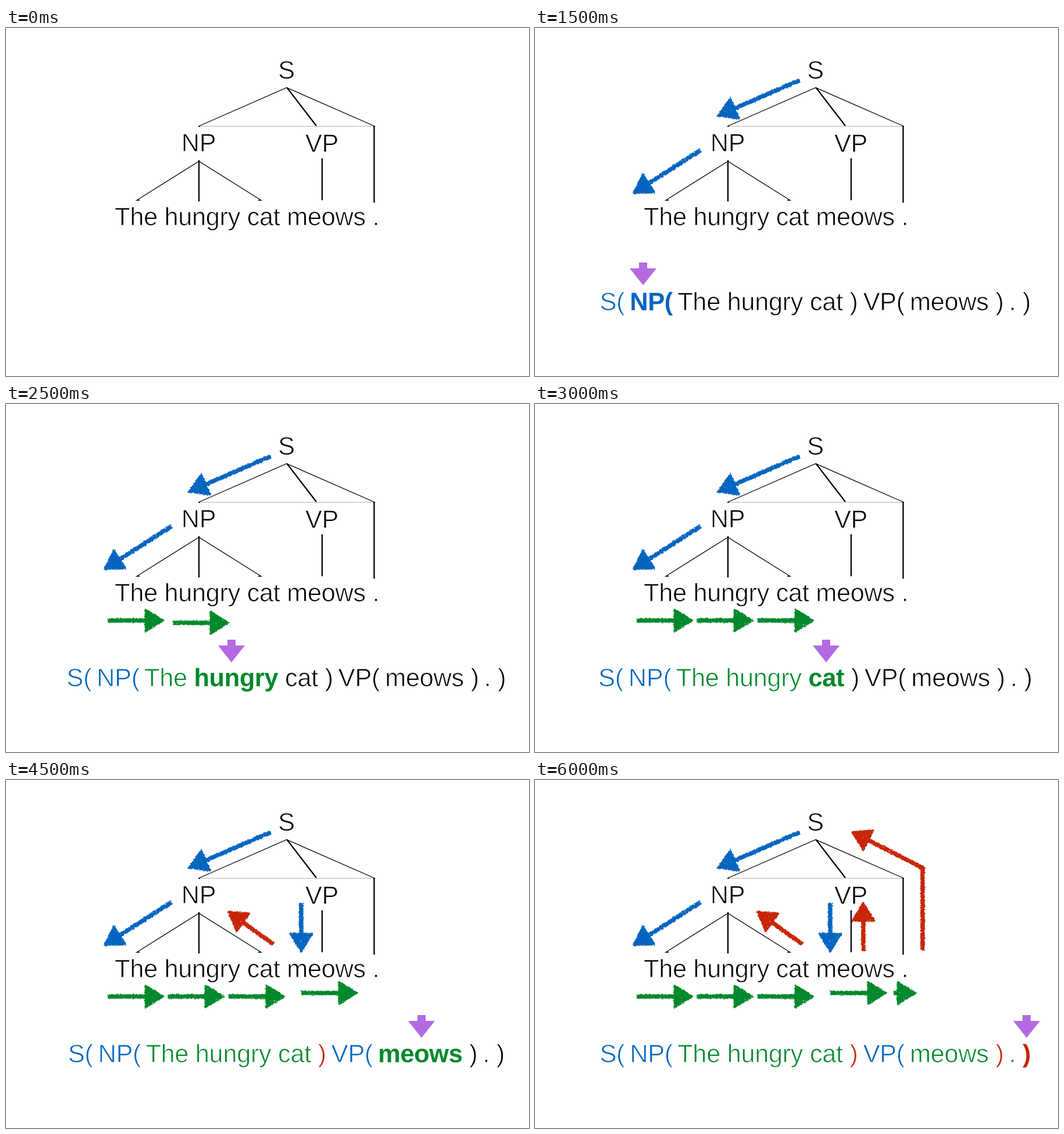
These frames come from a looping animation (900x598 px, 6.5 s). An HTML page:

```html
<!DOCTYPE html>
<html lang="en">
<head>
<meta charset="utf-8">
<title>Parse tree traversal</title>
<style>
  html, body { margin: 0; width: 100%; height: 100%; overflow: hidden; background: #fff; }
  svg { display: block; }
  /* The white outline thins the regular weight to a light one. */
  text {
    font: 43.4px "Liberation Sans", Arial, sans-serif; letter-spacing: -.35px;
    stroke: #fff; stroke-width: .9; white-space: pre; text-rendering: geometricPrecision;
  }
  .mid { text-anchor: middle; }
  .bold { font-weight: 700; stroke: none; }
  .paren { letter-spacing: -3px; }
  .tree { fill: none; stroke: #000; stroke-width: 1.3; }
  .thick { stroke-width: 2.3; }
</style>
</head>
<body>
<svg width="900" height="598" viewBox="0 0 900 598">
  <filter id="crayon" filterUnits="userSpaceOnUse" x="0" y="0" width="900" height="598" color-interpolation-filters="sRGB">
    <feTurbulence type="fractalNoise" baseFrequency=".33" numOctaves="2" seed="4" result="noise"/>
    <feDisplacementMap in="SourceGraphic" in2="noise" scale="4" xChannelSelector="R" yChannelSelector="G" result="rough"/>
    <feColorMatrix in="noise" values="0 0 0 0 0  0 0 0 0 0  0 0 0 0 0  0 0 0 8 -5.8" result="flecks"/>
    <feComposite in="rough" in2="flecks" operator="out"/>
  </filter>

  <g class="tree">
    <path d="M331 169H635" stroke="#aaa" stroke-width="1"/>
    <path d="M334 169H331L483 102.500 635 169H632M230 296H225L332 229 439 296H434"/>
    <path class="thick" d="M483.500 102.500L534 168M633.500 169V300M332 227V298M544 224V296"/>
  </g>
  <text class="mid" x="482.500" y="86.500">S</text>
  <text class="mid" x="331.500" y="211.500">NP</text>
  <text class="mid" x="543.500" y="212.500">VP</text>
  <text x="187" y="338.500">The hungry cat meows .</text>

  <g id="arrows" filter="url(#crayon)"></g>
  <path id="pointer" fill="#b36ae2" d="M-7 0h14v10h16L0 39-23 10h16z"/>
  <text id="sentence" class="mid" x="481" y="484.500"></text>
</svg>
<script>
const STEP = 500, STEPS = 13;
const BLUE = '#0365c0', GREEN = '#00882b', RED = '#c82506';
const TOKENS = 'S( NP( The hungry cat ) VP( meows ) . )'.split(' ');
const $ = id => document.getElementById(id);

// Pointer position for each step after the first
const POINTER = [[94, 403], [127, 403], [186, 403], [279, 405], [388, 405], [501, 405],
  [549, 405], [589, 405], [715, 404], [793, 403], [822, 404], [846, 404]];

// Colour, first step, last step, points from tail to tip
const ARROWS = [
  [BLUE, 2, 12, [455, 90], [314, 151]],
  [BLUE, 3, 12, [285, 210], [169, 284]],
  [GREEN, 4, 12, [175, 372], [272, 372]],
  [GREEN, 5, 5, [287, 376], [384, 376]],
  [GREEN, 6, 12, [278, 372], [375, 372]],
  [GREEN, 6, 12, [383, 372], [480, 372]],
  [RED, 7, 12, [460, 282], [382, 226]],
  [BLUE, 8, 12, [508, 211], [508, 296]],
  [GREEN, 9, 12, [508, 366], [605, 366]],
  [RED, 10, 12, [565, 294], [565, 210]],
  [GREEN, 11, 12, [617, 366], [656, 366]],
  [RED, 12, 12, [667, 293], [667, 151], [545, 89]]
];

function arrow([color, , , ...points]) {
  const [x, y] = points.pop(), [px, py] = points.at(-1);
  const angle = Math.atan2(y - py, x - px), cos = Math.cos(angle), sin = Math.sin(angle);
  const shaft = [...points, [x - 28 * cos, y - 28 * sin]].join(' ');
  return `<g fill="${color}" stroke="${color}" stroke-linejoin="round">
    <polyline points="${shaft}" fill="none" stroke-width="7.500"/>
    <path d="M-1 0L-32-19V19z" stroke-width="3" transform="translate(${x} ${y}) rotate(${angle * 180 / Math.PI})"/></g>`;
}

function token(text, i, step) {
  const current = step - 2;
  const color = i > current ? '#000' : text.endsWith('(') ? BLUE : text === ')' ? RED : GREEN;
  const body = text.replace(/[()]/, '<tspan class="paren">$&</tspan>');
  return `<tspan fill="${color}"${i === current ? ' class="bold"' : ''}>${body}</tspan>`;
}

function draw(step) {
  $('arrows').innerHTML = ARROWS.filter(([, from, to]) => step >= from && step <= to).map(arrow).join('');
  $('sentence').innerHTML = step ? TOKENS.map((text, i) => token(text, i, step)).join(' ') : '';
  $('pointer').style.display = step ? '' : 'none';
  if (step) $('pointer').setAttribute('transform', `translate(${POINTER[step - 1]})`);
}

let shown = -1;
function tick() {
  const step = Math.floor(performance.now() / STEP) % STEPS;
  if (step !== shown) draw(shown = step);
  requestAnimationFrame(tick);
}
tick();
</script>
</body>
</html>
```
